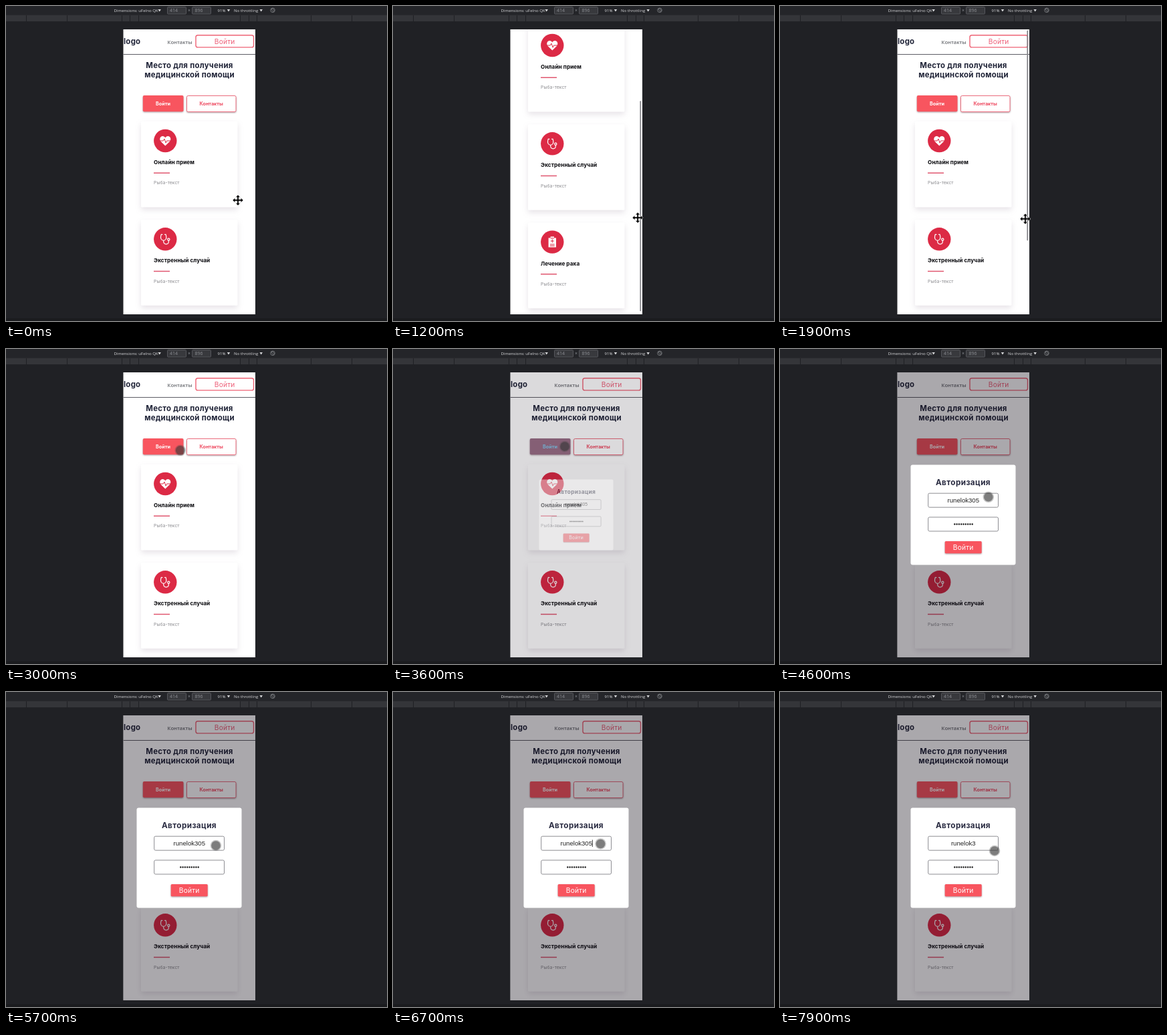
These frames come from a looping animation (570x472 px, 8 s). An HTML page:

```html
<!DOCTYPE html>
<html lang="ru">
<head>
<meta charset="utf-8">
<title>Mobile page preview</title>
<style>
html, body { margin: 0; width: 100%; height: 100%; overflow: hidden; background: #202125; }
svg { display: block; }
text { font-family: Inter, "Noto Sans", sans-serif; }
.tools text { font: 6.1px "Open Sans", sans-serif; fill: #d6d7d9; }
.tools .size { fill: #8d8f94; font-size: 7px; text-anchor: middle; }
.mid { text-anchor: middle; }
.bold { font-weight: 700; }
.heading { font-size: 11.4px; letter-spacing: .025em; fill: #202438; }
.nav { font: 600 7.6px "Open Sans", sans-serif; fill: #696b70; }
.entry { font-size: 10.2px; letter-spacing: .02em; }
.small { font-size: 7.2px; }
.title { font-size: 8.2px; letter-spacing: .01em; fill: #0c0c10; }
.note { font-size: 6.8px; letter-spacing: .01em; fill: #8c8c90; }
.field { fill: #fff; stroke: #8d8d92; }
.login { font: 9.6px "Liberation Sans", Arial, sans-serif; fill: #222; }
.card { fill: #fff; filter: drop-shadow(0 4px 4px rgba(110, 90, 120, .17)); }
.raised { filter: drop-shadow(0 1.5px 1px rgba(70, 40, 50, .45)); }
.line { fill: none; stroke: #fff; stroke-width: 1.2; stroke-linecap: round; }
</style>
</head>
<body>
<svg id="stage" width="570" height="472" viewBox="0 0 570 472">
  <rect width="570" height="472" fill="#202125"/>
  <rect y="468" width="570" height="4" fill="#1a1b1e"/>

  <g class="tools">
    <rect width="570" height="13" fill="#242529"/>
    <rect y="13.5" width="570" height="9.5" fill="#343539"/>
    <path id="ticks" stroke="#1f2024"/>
    <text x="161.5" y="9">Dimensions: uFelno QK</text>
    <rect x="241.5" y="1.5" width="28" height="10.5" rx="1" fill="#38393d" stroke="#55565b"/>
    <text class="size" x="251" y="9.3">414</text>
    <text class="size" x="274" y="9.3">×</text>
    <rect x="278.5" y="1.5" width="28" height="10.5" rx="1" fill="#38393d" stroke="#55565b"/>
    <text class="size" x="288.5" y="9.3">896</text>
    <text x="316.5" y="9">91%</text>
    <text x="341" y="9">No throttling</text>
    <path fill="#d6d7d9" d="M227.5 5h4.4l-2.2 3.6zM330.8 5h4.4l-2.2 3.6zM379.5 5h4.4l-2.2 3.6z"/>
    <g fill="none" stroke="#85878b" stroke-width=".8">
      <circle cx="399" cy="6.3" r="3.3"/>
      <path d="M397 5l2-1.5 2.5 3.5-2 1.5z"/>
    </g>
  </g>

  <clipPath id="screen"><rect x="175.5" y="35" width="197.5" height="427"/></clipPath>
  <g clip-path="url(#screen)">
    <rect x="175" y="35" width="198" height="427" fill="#fff"/>
    <g id="page">
      <text class="bold heading" x="176" y="56.5">logo</text>
      <text class="nav" x="241.5" y="56.8">Контакты</text>
      <rect x="284" y="43.7" width="86.5" height="18.2" rx="3" fill="#fff" stroke="#ee6274" stroke-width="1.4"/>
      <text class="mid entry" x="327.2" y="56.5" fill="#ee5f78">Войти</text>
      <path d="M175 72.5h198" stroke="#5d5d64"/>
      <text class="mid bold heading" x="274.5" y="93">Место для получения</text>
      <text class="mid bold heading" x="274.5" y="106.6">медицинской помощи</text>
      <rect id="enter" class="raised" x="204.8" y="134" width="60.7" height="24.3" rx="2"/>
      <text id="enterLabel" class="mid bold small" x="235" y="148.8">Войти</text>
      <rect class="raised" x="270.5" y="134.5" width="73.5" height="24" rx="2" fill="#fff" stroke="#ee7080"/>
      <text class="mid bold small" x="307.2" y="149.2" fill="#ee4b61">Контакты</text>
      <g id="cards"></g>
    </g>
    <rect id="thumb" x="369.4" width="1.8" height="315" rx=".9" fill="#85858a"/>
    <rect id="shade" x="175" y="35" width="198" height="427" fill="#0c0612"/>
    <g id="modal">
      <rect x="195.5" y="173.5" width="157" height="150" rx="3" fill="#fff"/>
      <text class="mid bold" x="274" y="203.5" font-size="11.7" letter-spacing=".035em" fill="#2a2c42">Авторизация</text>
      <rect class="field" x="221.7" y="216.2" width="104.8" height="21" rx="2"/>
      <text id="login" class="mid login" x="274.3" y="230"></text>
      <path id="caret" d="M298.3 221.5v10.5" stroke="#222" stroke-width=".9"/>
      <rect class="field" x="221.7" y="252" width="104.8" height="21" rx="2"/>
      <path d="M261.3 262.6h27" stroke="#222" stroke-width="2.5" stroke-linecap="round" stroke-dasharray="0 3.3"/>
      <rect class="raised" x="246.7" y="288" width="55" height="18.3" rx="1.5" fill="#f8555f"/>
      <text class="mid entry" x="274.2" y="300.7" fill="#fff">Войти</text>
    </g>
  </g>

  <g id="touch">
    <circle r="8.3" fill="#444" opacity=".3"/>
    <circle r="6.8" fill="#333" opacity=".5"/>
  </g>
  <path id="cross" stroke="#fff" stroke-width=".5" d="M0-8l3.4 3.6H1.2v3.2h3.2v-2.2L8 0 4.4 3.4V1.2H1.2v3.2h2.2L0 8l-3.4-3.6h2.2V1.2h-3.2v2.2L-8 0l3.6-3.4v2.2h3.2v-3.2h-2.2z"/>
</svg>

<script>
const LOOP = 8000, MAX_SCROLL = 143, LOGIN = 'runelok305';
const $ = id => document.getElementById(id);
const clamp = v => Math.min(1, Math.max(0, v));
const phase = (t, from, to) => clamp((t - from) / (to - from));
const smooth = p => p * p * (3 - 2 * p);
const between = (t, from, to) => t >= from && t < to;
const show = (id, visible) => $(id).setAttribute('visibility', visible ? 'visible' : 'hidden');
const set = (id, name, value) => $(id).setAttribute(name, value);

// CSS "ease": cubic-bezier(.25, .1, .25, 1), solved for x by bisection
function ease(x) {
  const curve = (a, b, u) => 3 * a * u * (1 - u) ** 2 + 3 * b * u * u * (1 - u) + u ** 3;
  let low = 0, high = 1;
  for (let i = 0; i < 20; i++) {
    const u = (low + high) / 2;
    if (curve(.25, .25, u) < x) low = u; else high = u;
  }
  return curve(.1, 1, low);
}

const heart = `<path fill="#fff" d="M0 7.5L-6.7 1C-9.2-2-8-6.8-4-7C-2-7-.8-6 0-4.6C.8-6 2-7 4-7C8-6.8 9.2-2 6.7 1z"/>
  <path fill="none" stroke="#dc2a45" d="M-8.5 0H-3L-1.4-3 .9 3.2 2.2 0H8.5"/>`;
const stethoscope = `<path class="line" d="M-4.4-7H-6Q-7.6-2-6 .2Q-4.6 2-2.6 2Q-.6 2 .8 .2Q2.2-2 .8-7H-.8M-2.6 2V4Q-2.2 7.5 1.3 7.5Q5 7.5 5 4V2"/>
  <circle class="line" cx="5" cy=".4" r="1.6"/>`;
const clipboard = `<path fill="#fff" d="M-5.7-6h3v-2h5.4v2h3v14H-5.7z"/>
  <path stroke="#dc2a45" d="M0-4v5M-2.5-1.5h5M-3.4 3.5h6.8M-3.4 5.7h6.8M-2.5-5.6h5"/>`;

$('cards').innerHTML = [
  ['Онлайн прием', heart],
  ['Экстренный случай', stethoscope],
  ['Лечение рака', clipboard]
].map(([title, icon], i) => `<g transform="translate(0 ${i * 147.3})">
  <rect class="card" x="202" y="173" width="144.5" height="128.5" rx="1.5"/>
  <circle cx="238.3" cy="202" r="17.2" fill="#dc2a45"/>
  <g transform="translate(238.3 202)">${icon}</g>
  <text class="bold title" x="221" y="237.2">${title}</text>
  <path d="M221 250.2h24" stroke="#e0566f" stroke-width="1.5"/>
  <text class="note" x="221" y="267.3">Рыба-текст</text>
</g>`).join('');

set('ticks', 'd', [30, 91, 173, 185, 198, 350, 363, 375, 456, 517].map(x => `M${x}.5 14v9`).join(''));

// Pointer stops: time, x, y
const stops = [
  [100, 347, 291], [1000, 366, 317], [1900, 367, 319], [2200, 367, 319],
  [3100, 257, 146], [3600, 257, 146], [3800, 309, 202], [4350, 312, 218],
  [5200, 311, 236], [5400, 314, 230], [5700, 314, 230], [6050, 251, 226],
  [6500, 311, 229], [6600, 311, 229], [6800, 310, 226], [7250, 310, 226], [7900, 321, 238]
];

function pointerAt(t) {
  const next = stops.findIndex(stop => stop[0] > t);
  if (next === 0) return stops[0].slice(1);
  if (next < 0) return stops[stops.length - 1].slice(1);
  const [t0, x0, y0] = stops[next - 1], [t1, x1, y1] = stops[next];
  const p = smooth(phase(t, t0, t1));
  return [x0 + (x1 - x0) * p, y0 + (y1 - y0) * p];
}

function draw(t) {
  const scroll = MAX_SCROLL * (smooth(phase(t, 50, 850)) - smooth(phase(t, 1250, 1850)));
  set('page', 'transform', `translate(0 ${-scroll})`);
  set('thumb', 'y', 36.5 + scroll * .74);
  set('thumb', 'opacity', phase(t, 50, 150) * (1 - phase(t, 2400, 2800)));

  const pressed = between(t, 3500, 3700);
  set('enter', 'fill', pressed ? '#9a6f87' : '#f8555f');
  set('enterLabel', 'fill', pressed ? '#83c9ec' : '#fff');

  const open = ease(phase(t, 3500, 3900));
  set('shade', 'opacity', .35 * open);
  set('modal', 'opacity', open);
  set('modal', 'transform', `translate(274 248.5) scale(${.5 + .5 * open}) translate(-274 -248.5)`);

  const erased = (t >= 7500) + (t >= 7700);
  $('login').textContent = LOGIN.slice(0, LOGIN.length - erased);
  show('caret', between(t, 6500, 7100));

  const position = `translate(${pointerAt(t)})`;
  const scrolling = t < 2300;
  set('cross', 'transform', position);
  set('touch', 'transform', position);
  show('cross', scrolling);
  show('touch', !scrolling);
}

const start = performance.now();
function tick() {
  draw((performance.now() - start) % LOOP);
  requestAnimationFrame(tick);
}
tick();
</script>
</body>
</html>
```
